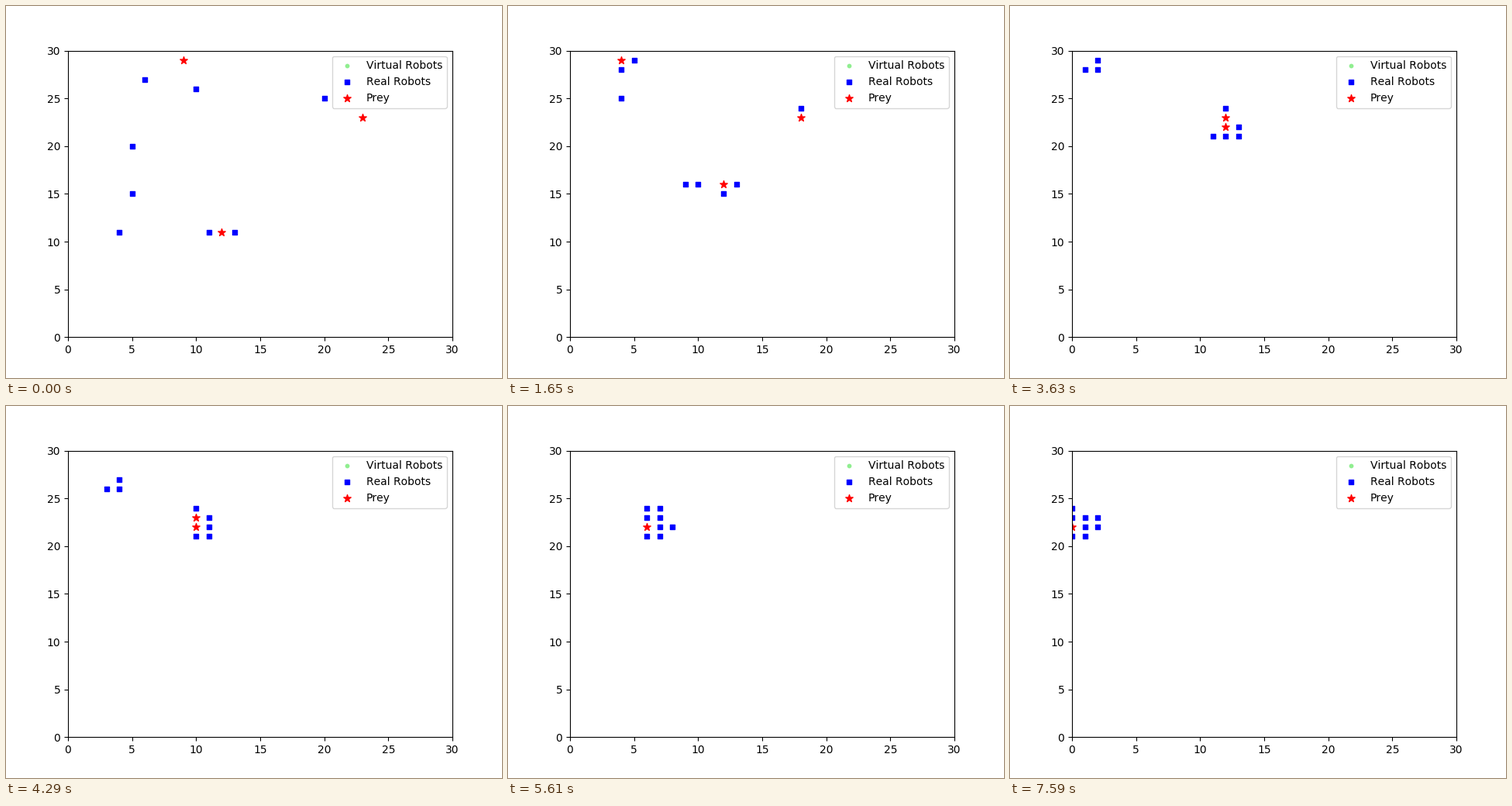
These frames come from a looping animation (640 by 480 pixels, 9580 ms). A matplotlib script:

```python
import itertools

import matplotlib.pyplot as plt
from matplotlib.animation import FuncAnimation

LOOP, TICK, STEP = 9580, 20, 330  # ms
LAST = 23                         # final step, held to the end of the loop
SIZE = 30

NORTH, SOUTH, WEST, EAST = (0, 1), (0, -1), (-1, 0), (1, 0)
MOVES = list(itertools.product((-1, 0, 1), (1, 0, -1)))


def add(a, b):
    return a[0] + b[0], a[1] + b[1]


def sub(a, b):
    return a[0] - b[0], a[1] - b[1]


def dot(a, b):
    return a[0] * b[0] + a[1] * b[1]


def dist2(a, b):
    return dot(sub(a, b), sub(a, b))


class Prey:
    """Runs straight on and falls back to its second direction when blocked."""

    def __init__(self, pos, *ways):
        self.pos, self.ways = pos, list(ways)

    def move(self, is_free):
        ahead = add(self.pos, self.ways[0])
        if not is_free(ahead) and len(self.ways) > 1:
            self.ways.pop(0)
            ahead = add(self.pos, self.ways[0])
        if is_free(ahead):
            self.pos = ahead

    def escape(self):
        return add(self.pos, self.ways[1]) if len(self.ways) > 1 else None


def chase(pos, prey, is_free):
    """Closest free cell to the prey, without overtaking or closing its escape."""
    heading = prey.ways[0]

    def lead(cell):
        return dot(sub(cell, prey.pos), heading)

    def allowed(cell):
        overtakes = lead(pos) <= 0 < lead(cell)
        return is_free(cell) and cell != prey.escape() and not overtakes

    def cost(cell):
        return dist2(cell, prey.pos), cell != pos, -dot(sub(cell, pos), heading)

    cells = [add(pos, m) for m in MOVES]
    return min((c for c in cells if c == pos or allowed(c)), key=cost)


def hunt():
    """Return (robots, prey) positions for every step."""
    robots = [(20, 25), (6, 27), (10, 26), (5, 20),
              (5, 15), (13, 11), (4, 11), (11, 11)]
    herd = [Prey((12, 11), NORTH, WEST), Prey((9, 29), WEST, NORTH),
            Prey((23, 23), WEST, SOUTH)]

    def is_free(cell):
        inside = all(0 <= v <= SIZE for v in cell)
        return inside and cell not in robots and all(cell != p.pos for p in herd)

    def caught(prey):
        return not any(is_free(add(prey.pos, w))
                       for w in (NORTH, SOUTH, WEST, EAST))

    steps = [(list(robots), [p.pos for p in herd])]
    for _ in range(LAST):
        gone = [p for p in herd if caught(p)]
        for prey in gone:
            herd.remove(prey)
        for prey in herd:
            prey.move(is_free)
        for i, pos in enumerate(robots):
            nearest = min(herd, key=lambda p: dist2(p.pos, pos))
            robots[i] = chase(pos, nearest, is_free)
        steps.append((list(robots), [p.pos for p in herd]))
    return steps


steps = hunt()

plt.rcParams['text.kerning_factor'] = 6
fig, ax = plt.subplots(figsize=(6.4, 4.8), dpi=100)
ax.set(xlim=(0, SIZE), ylim=(0, SIZE))


def dots(marker, size, color, label):
    return ax.scatter([], [], s=size, marker=marker, color=color,
                      linewidths=1, label=label)


dots('o', 10, 'lightgreen', 'Virtual Robots')
robot_dots = dots('s', 20, 'blue', 'Real Robots')
prey_dots = dots('*', 50, 'red', 'Prey')
ax.legend(loc='upper right')


def update(frame):
    # Half a tick of lead keeps the odd steps on time.
    step = min((frame * TICK + TICK // 2) // STEP, LAST)
    robots, herd = steps[step]
    robot_dots.set_offsets(robots)
    prey_dots.set_offsets(herd)
    return robot_dots, prey_dots


anim = FuncAnimation(fig, update, frames=LOOP // TICK, interval=TICK,
                     repeat=True, repeat_delay=0)
plt.show()
```
